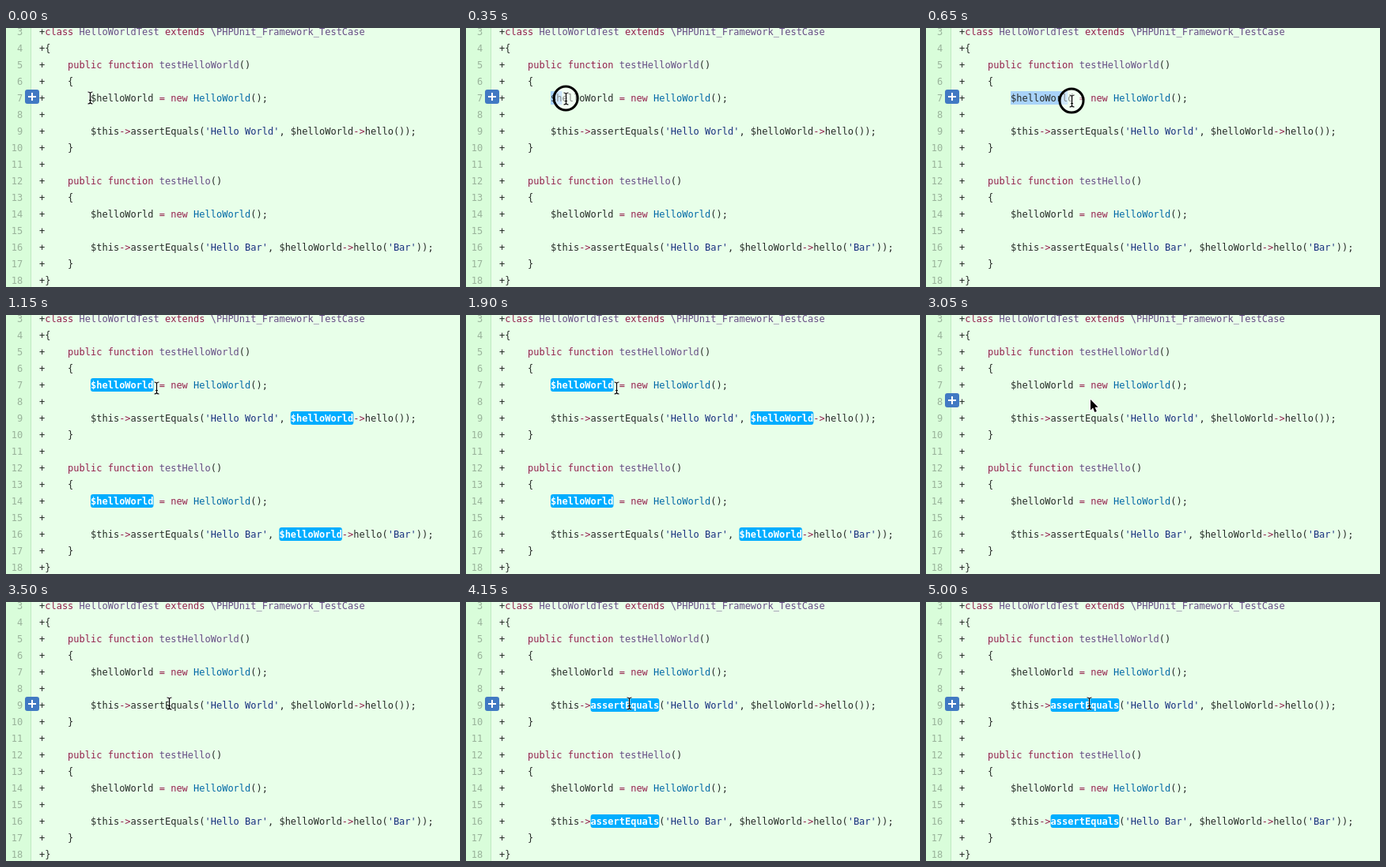
An HTML page with a canvas that plays this animation: 574 px wide and 328 px high, repeating every 5050 ms.

```html
<!DOCTYPE html>
<html lang="en">
<head>
<meta charset="utf-8">
<title>Highlight selected words</title>
<style>
html, body { margin: 0; width: 100%; height: 100%; overflow: hidden; background: #e8ffe9; }
canvas { display: block; width: 574px; height: 328px; }
</style>
</head>
<body>
<canvas id="stage"></canvas>
<script>
const W = 574, H = 328, LOOP = 5050, STEP = 50;
const LEFT = 42, CHAR = 7.224, ROW = 21, FIRST = 3;
const FONT = '12px "DejaVu Sans Mono", monospace';

const canvas = document.getElementById('stage');
const ratio = window.devicePixelRatio || 1;
canvas.width = W * ratio;
canvas.height = H * ratio;
const ctx = canvas.getContext('2d');
ctx.scale(ratio, ratio);

const lines = [
  'class HelloWorldTest extends \\PHPUnit_Framework_TestCase',
  '{',
  '    public function testHelloWorld()',
  '    {',
  '        $helloWorld = new HelloWorld();',
  '',
  "        $this->assertEquals('Hello World', $helloWorld->hello());",
  '    }',
  '',
  '    public function testHello()',
  '    {',
  '        $helloWorld = new HelloWorld();',
  '',
  "        $this->assertEquals('Hello Bar', $helloWorld->hello('Bar'));",
  '    }',
  '}'
].map(s => '+' + s);

// Earlier rules win where two match at the same place
const rules = [
  ["'[^']*'", '#17307f'],
  ['HelloWorldTest|testHello(?:World)?|\\\\PHPUnit\\w+', '#664d85'],
  ['HelloWorld(?=\\()', '#0068a6'],
  ['\\b(?:class|extends|public|function|new)\\b|->|=', '#94204c']
];
const syntax = new RegExp(rules.map(r => '(' + r[0] + ')').join('|'), 'g');

const baseline = n => 9 + (n - FIRST) * ROW;
const colX = col => LEFT + col * CHAR;

function glyphs(text, x, y, color, weight = '') {
  ctx.font = weight + FONT;
  ctx.fillStyle = color;
  [...text].forEach((c, i) => c !== ' ' && ctx.fillText(c, x + i * CHAR, y));
}

function roundBox(x, y, w, h, r, color) {
  ctx.fillStyle = color;
  ctx.beginPath();
  ctx.roundRect(x, y, w, h, r);
  ctx.fill();
}

function drawCodeLine(text, n) {
  const y = baseline(n);
  let at = 0;
  const put = (part, color) => {
    glyphs(part, colX(at), y, color);
    at += part.length;
  };
  for (const m of text.matchAll(syntax)) {
    put(text.slice(at, m.index), '#262b27');
    put(m[0], rules[m.slice(1).findIndex(Boolean)][1]);
  }
  put(text.slice(at), '#262b27');
}

function drawPage() {
  ctx.fillStyle = '#e8ffe9';
  ctx.fillRect(0, 0, W, H);
  ctx.fillStyle = '#d9fdda';
  ctx.fillRect(0, 0, 31, H);
  ctx.fillStyle = '#bee8c0';
  ctx.fillRect(31, 0, 1, H);
}

function drawText() {
  lines.forEach((text, i) => {
    const n = FIRST + i, label = String(n);
    glyphs(label, 21.3 - label.length * CHAR, baseline(n), '#9ab39b');
    drawCodeLine(text, n);
  });
}

function highlight(word) {
  lines.forEach((text, i) => {
    const col = text.indexOf(word);
    if (col < 0) return;
    const x = colX(col), y = baseline(FIRST + i);
    roundBox(x, y - 13, word.length * CHAR, 17, 3, '#00adff');
    glyphs(word, x, y, '#fff', 'bold ');
  });
}

function drawButton(row) {
  const y = baseline(row) - 15;
  roundBox(24, y, 18, 18, 3, '#4179c3');
  ctx.fillStyle = '#fff';
  ctx.fillRect(28, y + 8, 10, 2);
  ctx.fillRect(32, y + 4, 2, 10);
}

function drawBeam(x, y) {
  const path = new Path2D(
    'M-3-7.5Q-.5-7.5 0-6Q.5-7.5 3-7.5M0-6V6M-3 7.5Q-.5 7.5 0 6Q.5 7.5 3 7.5M-1.5 3H1.5');
  ctx.save();
  ctx.translate(Math.round(x) + .5, Math.round(y) + .5);
  ctx.lineWidth = 2.6;
  ctx.strokeStyle = 'rgba(255,255,255,.65)';
  ctx.stroke(path);
  ctx.lineWidth = 1.2;
  ctx.strokeStyle = '#000';
  ctx.stroke(path);
  ctx.restore();
}

function drawArrow(x, y) {
  const path = new Path2D('M0 0V13.5L3.1 10.6L5.3 16L7.8 15L5.5 9.8H9.6Z');
  ctx.save();
  ctx.translate(x, y);
  ctx.lineJoin = 'round';
  ctx.lineWidth = 2;
  ctx.strokeStyle = '#fff';
  ctx.stroke(path);
  ctx.fillStyle = '#000';
  ctx.fill(path);
  ctx.restore();
}

function drawPress(x, y) {
  ctx.beginPath();
  ctx.arc(x, y, 15, 0, Math.PI * 2);
  ctx.fillStyle = 'rgba(255,255,255,.45)';
  ctx.fill();
  ctx.lineWidth = 3;
  ctx.strokeStyle = '#000';
  ctx.stroke();
}

// Pointer path: time, x, y
const path = [
  [0, 106, 88], [200, 106, 88], [650, 184, 92], [750, 190, 92],
  [2300, 190, 92], [2500, 208, 107], [3050, 208, 107], [3300, 206, 128], [LOOP, 206, 128]
];
const presses = [[150, 850], [2850, 2950], [3850, 3900], [3950, 4000]];

function pointer(t) {
  const i = path.findIndex(p => p[0] > t);
  const [t0, x0, y0] = path[i - 1], [t1, x1, y1] = path[i];
  const k = (t - t0) / (t1 - t0), e = k * k * (3 - 2 * k);
  return [x0 + (x1 - x0) * e, y0 + (y1 - y0) * e];
}

function draw(t) {
  const [x, y] = pointer(t);
  const row = 7 + Math.floor((y - 78) / ROW);

  drawPage();
  if (t >= 150 && t < 900) {
    const count = Math.max(0, Math.min(11, Math.floor((x - colX(9)) / CHAR)));
    ctx.fillStyle = '#a9d3f9';
    ctx.fillRect(colX(9), baseline(7) - 13, count * CHAR, 17);
  }
  drawText();
  if (t >= 900 && t < 2950) highlight('$helloWorld');
  if (t >= 4000) highlight('assertEquals');
  if (t < 900 || row > 7) drawButton(row);
  if (presses.some(([a, b]) => t >= a && t < b)) drawPress(x, y);
  (row === 8 ? drawArrow : drawBeam)(x, y);
}

const start = performance.now();
function tick() {
  const t = (performance.now() - start) % LOOP;
  draw(Math.floor(t / STEP) * STEP);
  requestAnimationFrame(tick);
}
tick();
</script>
</body>
</html>
```
